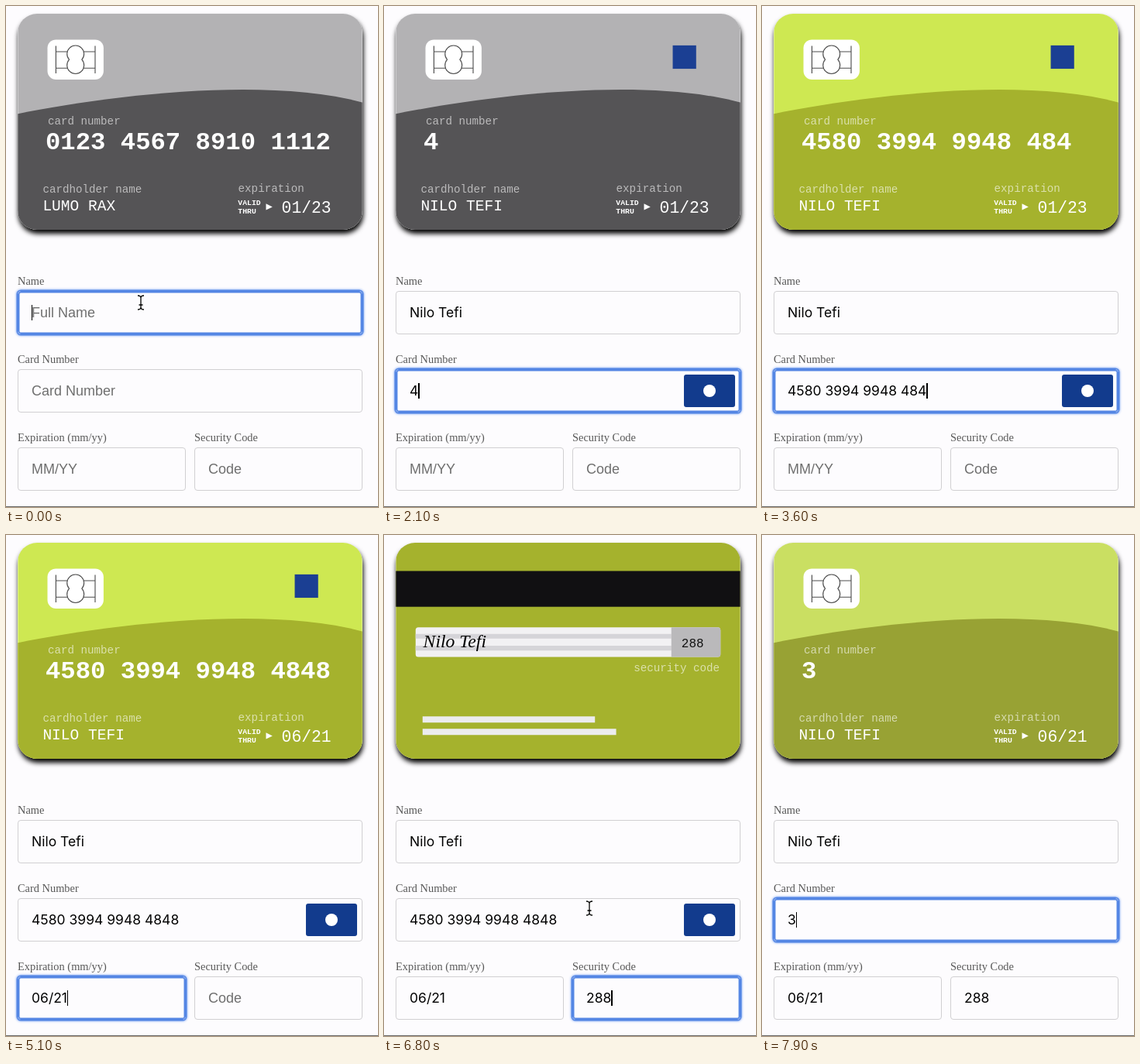
Recreate the animation shown at these times as an HTML page. Size 480x647 px, loop 8 s.

```html
<!DOCTYPE html>
<html lang="en">
<head>
<meta charset="utf-8">
<title>Card form</title>
<style>
html, body { margin: 0; width: 100%; height: 100%; overflow: hidden; background: #fdfcfe; }
#stage { position: relative; width: 480px; height: 647px; overflow: hidden; }
#stage::after { content: ""; position: absolute; left: 0; top: 646px; width: 480px; height: 1px; background: #6a6a6a; }
#scene { position: absolute; left: 15px; top: 10px; width: 445px; height: 279px; perspective: 1157px; }
#card { width: 100%; height: 100%; transform-style: preserve-3d; }
.face { position: absolute; inset: 0; border-radius: 25px; box-shadow: 1px 5px 6px 0 #000; backface-visibility: hidden; }
.face svg { display: block; width: 100%; height: 100%; border-radius: 25px; }
#back { transform: rotateY(180deg); }
.light { fill: var(--light); }
.dark { fill: var(--dark); }
svg text { font-family: "Liberation Mono", "Courier New", monospace; fill: #fff; white-space: pre; }
.cap { font-size: 24px; fill-opacity: .6; }
.label { position: absolute; font: 14.4px/16px "Liberation Serif", "Times New Roman", serif; color: #585858; white-space: pre; }
.field { position: absolute; box-sizing: border-box; height: 56px; padding-left: 17px; border: 1px solid #d1d0d2; border-radius: 4px;
  display: flex; align-items: center; white-space: pre; color: #000; font: 17.5px/22px Inter, sans-serif; }
.field.on { border-color: #5486e4; box-shadow: 0 0 0 1.5px #5486e4, inset 0 0 0 1.5px #5486e4, 0 0 3px 2px #8fb2f5; }
.field i { width: 1.3px; height: 20px; margin-right: -1.3px; background: #000; }
.field em { font: 18px/22px "Liberation Sans", Arial, sans-serif; color: #6f6f6f; }
#badge { position: absolute; left: 387px; top: 476px; width: 66px; height: 42px; border-radius: 3px; background: #123b8d; }
#badge::after { content: ""; position: absolute; left: 25px; top: 13px; width: 16px; height: 16px; border-radius: 50%; background: #fff; }
#mouse { position: absolute; left: -10px; top: -12px; width: 20px; height: 24px; }
#mouse path { fill: none; stroke: #fff; stroke-width: 3; }
#mouse path + path { stroke: #000; stroke-width: 1.3; }
</style>
</head>
<body>
<div id="stage">
  <div id="scene"><div id="card">
    <div class="face"><svg viewBox="0 0 750 471">
      <rect class="light" width="750" height="471"/>
      <path class="dark" d="M750 471V193.2C532.4 135.7 193.6 179.7 0 218.1V471z"/>
      <rect x="64.4" y="56.4" width="122.2" height="87.2" rx="18.5" fill="#fff"/>
      <g fill="none" stroke="#4c4c4c" stroke-width="1.9">
        <path d="M82.8 70v60M168.2 70v60M82.8 82.8h25.8M82.8 118.6h25.8M142.4 82.8h25.8M142.4 118.6h25.8"/>
        <path d="M111.7 100A18.5 18.5 0 1 1 139.3 100A18.5 18.5 0 1 1 111.7 100z"/>
      </g>
      <rect id="mark" x="603" y="69" width="51" height="51" fill="#1b3f93"/>
      <text class="cap" x="65.1" y="241.5">card number</text>
      <text id="cardNumber" x="60.1" y="295" font-size="54.5" font-weight="bold"></text>
      <text class="cap" x="54.1" y="389.9">cardholder name</text>
      <text id="cardName" x="54.1" y="428.2" font-size="33"></text>
      <text class="cap" x="479.8" y="388.9">expiration</text>
      <text x="479.4" y="417" font-size="16.5" font-weight="bold">VALID</text>
      <text x="479.4" y="435.7" font-size="16.5" font-weight="bold">THRU</text>
      <path d="M554.5 421L540.4 414.2V427.9z" fill="#fff"/>
      <text id="cardDate" x="574.4" y="433.8" font-size="36"></text>
    </svg></div>
    <div class="face" id="back"><svg viewBox="0 0 750 471">
      <rect class="dark" width="750" height="471"/>
      <rect y="61.6" width="750" height="78" fill="#111012"/>
      <rect x="42.9" y="184.6" width="664.2" height="64.5" rx="6" fill="#f2f1f3"/>
      <path d="M42.9 198.6H600v10.5H42.9zM42.9 224.5H600v10.5H42.9z" fill="#d5d4d8"/>
      <path d="M600 184.6H701.1q6 0 6 6V243.1q0 6-6 6H600z" fill="#bab9bb"/>
      <text id="sign" x="59.5" y="228.6" style="font: italic 40px 'Liberation Serif', serif; fill: #000"></text>
      <text id="cardCode" x="622" y="227.3" font-size="27" style="fill: #111"></text>
      <text class="cap" x="518.1" y="280.1">security code</text>
      <path d="M58.1 378.6h375.5v13.5H58.1zM58.1 405.6h421.7v13.5H58.1z" fill="#ececee"/>
    </svg></div>
  </div></div>
  <div id="form"></div>
  <div id="badge"></div>
  <svg id="mouse" viewBox="-10 -12 20 24"></svg>
</div>
<script>
const LOOP = 8000, STEP = 100, BLINK = 300;
const NAME = "Nilo Tefi", DIGITS = "4580399499484848", CODE = "288";
const DATES = ["", "0", "06", "06/21"];
const GREY = [[179, 178, 180], [85, 84, 86]], LIME = [[206, 232, 82], [165, 178, 45]];

const keys = {
  name: [100, 300, 400, 500, 600, 700, 900, 1000, 1100],
  number: [2100, ...Array.from({ length: 15 }, (_, i) => 2300 + 100 * i)],
  date: [4600, 4800, 5100],
  code: [6100, 6300, 6500]
};
const retype = 7900;
const focuses = [[0, "name"], [1300, "number"], [4000, "date"], [5500, "code"], [7100, "number"]];
// moments that make the caret solid again
const wakes = [...Object.values(keys).flat(), ...focuses.map(f => f[0]), 5200, 6600, retype];

const $ = id => document.getElementById(id);
const clamp = v => Math.min(1, Math.max(0, v));
const mix = (a, b, k) => a + (b - a) * k;
const rgb = (i, k) => `rgb(${GREY[i].map((v, j) => Math.round(mix(v, LIME[i][j], k)))})`;
const group = s => s.replace(/(.{4})(?=.)/g, "$1 ");

function bezier(x1, y1, x2, y2) {
  const at = (a, b, s) => 3 * (1 - s) ** 2 * s * a + 3 * (1 - s) * s * s * b + s ** 3;
  return x => {
    if (x <= 0 || x >= 1) return clamp(x);
    let lo = 0, hi = 1;
    for (let i = 0; i < 24; i++) {
      const s = (lo + hi) / 2;
      if (at(x1, x2, s) < x) lo = s; else hi = s;
    }
    return at(y1, y2, lo);
  };
}
const ease = bezier(.25, .1, .25, 1);
const flip = bezier(.71, .03, .56, .85);

const fields = {};
function addField(id, label, hint, x, y, w) {
  $("form").insertAdjacentHTML("beforeend",
    `<div class="label" style="left:${x}px;top:${y - 21}px">${label}</div>
     <div class="field" style="left:${x}px;top:${y}px;width:${w}px"><span></span><i></i><em>${hint}</em></div>`);
  const box = $("form").lastElementChild;
  const [value, caret, ghost] = box.children;
  fields[id] = { box, value, caret, ghost };
}
addField("name", "Name", "Full Name", 15, 368, 445);
addField("number", "Card Number", "Card Number", 15, 469, 445);
addField("date", "Expiration (mm/yy)", "MM/YY", 15, 570, 217);
addField("code", "Security Code", "Code", 243, 570, 217);

const beam = "M-4-9Q0-9 0-6Q0-9 4-9M0-6V6M-4 9Q0 9 0 6Q0 9 4 9M-2.5 3h5";
$("mouse").innerHTML = `<path d="${beam}"/><path d="${beam}"/>`;

function draw(t) {
  const typed = id => keys[id].filter(k => k <= t).length;
  const values = {
    name: NAME.slice(0, typed("name")),
    number: t >= retype ? "3" : group(DIGITS.slice(0, typed("number"))),
    date: DATES[typed("date")],
    code: CODE.slice(0, typed("code"))
  };

  const active = focuses.filter(f => f[0] <= t).pop()[1];
  const woke = Math.max(...wakes.filter(w => w <= t));
  const lit = Math.floor((t - woke) / BLINK) % 2 === 0;
  for (const id in fields) {
    const f = fields[id];
    f.value.textContent = values[id];
    f.ghost.style.display = values[id] ? "none" : "";
    f.box.classList.toggle("on", id === active);
    f.caret.style.visibility = id === active && lit ? "visible" : "hidden";
  }

  $("cardName").textContent = values.name.toUpperCase() || "LUMO RAX";
  $("cardNumber").textContent = values.number || "0123 4567 8910 1112";
  $("cardDate").textContent = values.date || "01/23";
  $("cardCode").textContent = values.code;
  $("sign").textContent = values.name;

  const known = t >= 2100 && t < retype;
  $("mark").style.display = $("badge").style.display = known ? "" : "none";

  const tint = ease(clamp((t - 2110) / 250)) - ease(clamp((t - 7865) / 250));
  $("card").style.setProperty("--light", rgb(0, tint));
  $("card").style.setProperty("--dark", rgb(1, tint));

  const turn = flip(clamp((t - 5441) / 300)) - flip(clamp((t - 7050) / 300));
  $("card").style.transform = `rotateY(${180 * turn}deg)`;

  const go = clamp((t - 6500) / 300);
  $("mouse").style.visibility = t < 100 || (t >= 6600 && t < retype) ? "visible" : "hidden";
  $("mouse").style.transform = `translate(${mix(174, 265, go)}px, ${mix(383, 482, go)}px)`;
}

const start = performance.now();
function tick() {
  const t = (performance.now() - start) % LOOP;
  draw(Math.floor(t / STEP) * STEP);
  requestAnimationFrame(tick);
}
tick();
</script>
</body>
</html>
```
